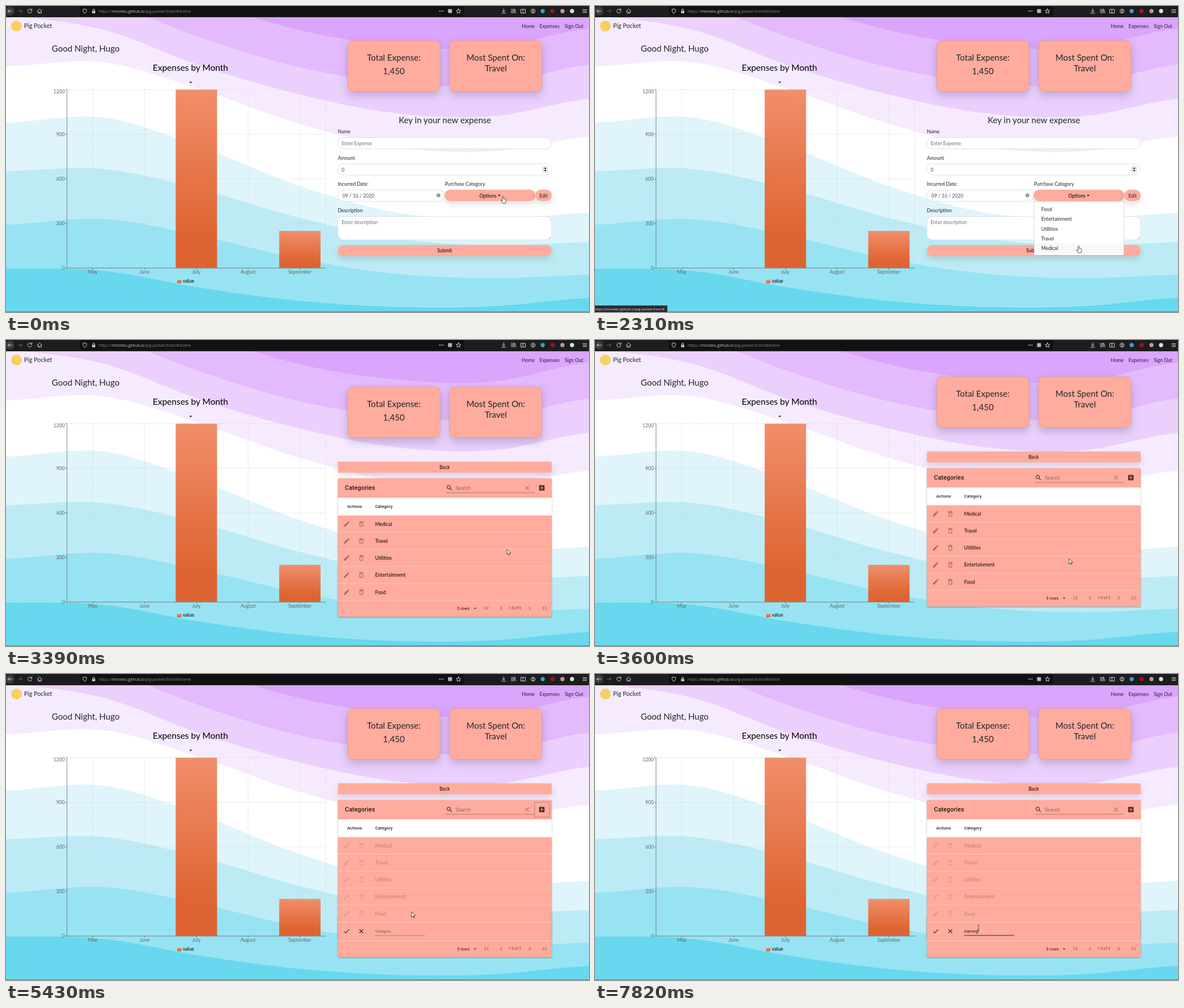
Recreate the animation shown at these times as an HTML page. Size 1032 by 543 pixels, loop 8000 ms.

```html
<!DOCTYPE html>
<html lang="en">
<head>
<meta charset="utf-8">
<title>Expense dashboard</title>
<style>
html, body { margin: 0; width: 100%; height: 100%; overflow: hidden; background: #fff; }
svg { display: block; width: 100vw; height: 100vh; }
text { font-family: Lato, sans-serif; font-size: 8.6px; fill: #212529; white-space: pre; }
.h { font-size: 15.05px; }
.m { text-anchor: middle; }
.e { text-anchor: end; }
.ax { fill: #666; }
.ph { fill: #6c757d; }
.val { fill: #495057; }
.blk { fill: #000; }
.rb { font-family: Roboto, sans-serif; font-size: 7.5px; fill: rgba(0,0,0,.87); }
.md { font-weight: 500; letter-spacing: .01em; }
.ui { font-family: "Open Sans", "Noto Sans", sans-serif; font-size: 6.9px; fill: #8b8b8d; }
.card { filter: drop-shadow(0 8px 8px rgba(0,0,0,.18)); }
.btn { filter: drop-shadow(0 5px 6px rgba(0,0,0,.13)); }
.paper { filter: drop-shadow(0 1px 1.3px rgba(0,0,0,.35)); }
.ln { fill: none; stroke: #d2d2d3; stroke-width: 1; stroke-linecap: round; stroke-linejoin: round; }
#line { transform-origin: 697px 464px; }
</style>
</head>
<body>
<svg id="stage" viewBox="0 0 1032 543" preserveAspectRatio="none"></svg>
<script>
const LOOP = 8000, PINK = '#ffab9d';
const EDIT = 3210, ADD = 4800, FOCUS = 5960;
let css = '';

// stops: [ms, declarations]
function keys(id, stops, ease = 'step-end') {
  const body = stops.map(([t, d]) => `${(t / LOOP * 100).toFixed(3)}%{${d}}`).join('');
  css += `@keyframes ${id}{${body}}#${id}{animation:${id} ${LOOP}ms ${ease} infinite}`;
}
function show(id, ...spans) {
  const stops = spans[0][0] > 0 ? [[0, 'opacity:0']] : [];
  for (const [a, b] of spans) stops.push([a, 'opacity:1'], [b, b < LOOP ? 'opacity:0' : 'opacity:1']);
  if (stops[stops.length - 1][0] < LOOP) stops.push([LOOP, 'opacity:0']);
  keys(id, stops);
}
const move = (x, y) => `transform:translate(${x}px,${y}px)`;

const text = (x, y, s, cls = '', more = '') => `<text x="${x}" y="${y}" class="${cls}" ${more}>${s}</text>`;
const rect = (x, y, w, h, r, fill, more = '') =>
  `<rect x="${x}" y="${y}" width="${w}" height="${h}" rx="${r}" fill="${fill}" ${more}/>`;
const path = (d, more = '') => `<path d="${d}" ${more}/>`;
const dot = (x, y, r, fill) => `<circle cx="${x}" cy="${y}" r="${r}" fill="${fill}"/>`;
const group = (id, s, more = '') => `<g id="${id}" ${more}>${s}</g>`;
const icon = (d, x, y, a) =>
  path(d, `fill="rgba(0,0,0,${a})" transform="translate(${x - 6.45} ${y - 6.45}) scale(.5375)"`);
const caret = (x, y) => path(`M${x - 2.4} ${y}h4.8l-2.4 2.5z`);

const ICON = {
  edit: 'M3 17.25V21h3.75L17.81 9.94l-3.75-3.75L3 17.25zM20.71 7.04c.39-.39.39-1.02 0-1.41l-2.34-2.34c-.39-.39-1.02-.39-1.41 0l-1.83 1.83 3.75 3.75 1.83-1.83z',
  bin: 'M6 19c0 1.1.9 2 2 2h8c1.1 0 2-.9 2-2V7H6v12zM8 9h8v10H8V9zm7.5-5l-1-1h-5l-1 1H5v2h14V4z',
  search: 'M15.5 14h-.79l-.28-.27C15.41 12.59 16 11.11 16 9.5 16 5.91 13.09 3 9.5 3S3 5.91 3 9.5 5.91 16 9.5 16c1.61 0 3.09-.59 4.23-1.57l.27.28v.79l5 4.99L20.49 19l-4.99-5zm-6 0C7.01 14 5 11.99 5 9.5S7.01 5 9.5 5 14 7.01 14 9.5 11.99 14 9.5 14z',
  cross: 'M19 6.41L17.59 5 12 10.59 6.41 5 5 6.41 10.59 12 5 17.59 6.41 19 12 13.41 17.59 19 19 17.59 13.41 12z',
  plus: 'M19 3H5c-1.11 0-2 .9-2 2v14c0 1.1.89 2 2 2h14c1.1 0 2-.9 2-2V5c0-1.1-.9-2-2-2zm-2 10h-4v4h-2v-4H7v-2h4V7h2v4h4v2z',
  check: 'M9 16.17L4.83 12l-1.42 1.41L9 19 21 7l-1.41-1.41z',
  down: 'M7 10l5 5 5-5z',
  first: 'M18.41 16.59L13.82 12l4.59-4.59L17 6l-6 6 6 6zM6 6h2v12H6z',
  prev: 'M15.41 7.41L14 6l-6 6 6 6 1.41-1.41L10.83 12z',
  next: 'M10 6L8.59 7.41 13.17 12l-4.58 4.59L10 18l6-6z',
  last: 'M5.59 7.41L10.18 12l-4.59 4.59L7 18l6-6-6-6zM16 6h2v12h-2z'
};

// Smooth curve through evenly spaced heights, closed to the given edge
function wave(ys, edge, fill) {
  const step = 1032 / (ys.length - 1), last = ys.length - 1;
  const slope = i => (ys[Math.min(i + 1, last)] - ys[Math.max(i - 1, 0)]) / 6;
  let d = `M0 ${edge}V${ys[0]}`;
  for (let i = 0; i < last; i++) {
    d += `C${(i + 1 / 3) * step} ${ys[i] + slope(i)} ${(i + 2 / 3) * step} ${ys[i + 1] - slope(i + 1)} ${(i + 1) * step} ${ys[i + 1]}`;
  }
  return path(d + `V${edge}Z`, `fill="${fill}"`);
}

function background() {
  return rect(0, 0, 1032, 543, 0, '#fff') +
    wave([107, 100, 148, 208, 250, 258, 232], 0, '#f6ebfe') +
    wave([18, 42, 106, 156, 190, 196, 165], 0, '#ebd0fe') +
    wave([-60, -10, 56, 108, 136, 140, 104], 0, '#e3bafe') +
    wave([-150, -80, -12, 42, 70, 74, 40], 0, '#daa5fd') +
    wave([207, 198, 250, 318, 366, 378, 367], 543, '#dff5fb') +
    wave([293, 289, 325, 375, 412, 425, 419], 543, '#bcebf6') +
    wave([388, 378, 408, 448, 475, 483, 477], 543, '#97e3f3') +
    wave([466, 470, 500, 523, 534, 533, 518], 543, '#67d8ee') +
    rect(0, 542, 1032, 1, 0, '#3f8fa6');
}

function browser() {
  const ln = d => path(d, 'class="ln"');
  return rect(0, 0, 1032, 20, 0, '#1d1d1f') + rect(131, 0, 680, 18, 1.5, '#111112') +
    dot(7, 9, 8, '#3b3b3d') + ln('M10.5 9H3.5M6.5 6L3.5 9l3 3') +
    path('M21.5 9h7M25.500 6l3 3-3 3', 'class="ln" style="stroke:#666"') +
    ln('M45 6.500A3.600 3.600 0 1 0 45.800 9.500M45.800 5v2.500h-2.500') +
    ln('M55.500 9l4-3.800 4 3.800M56.700 8.500v4h5.600v-4M59.500 12.500v-2') +
    ln('M139.500 5.300l3.200 1c0 3.500-.7 5.500-3.200 7-2.500-1.500-3.200-3.500-3.200-7z') +
    rect(152.300, 8.500, 5.800, 4.400, .6, '#bbb') + ln('M153.500 8.500v-1.300a1.700 1.700 0 0 1 3.400 0v1.300') +
    `<text x="164" y="11.800" class="ui">https://<tspan fill="#c9c9ca">mirotelu.github.io</tspan>/pig-pocket-front/#/home</text>` +
    [767.500, 770.500, 773.500].map(x => dot(x, 9, .9, '#ccc')).join('') +
    rect(782.500, 5.500, 7, 7, 1, '#b5b5b6') +
    ln('M801 5l1.200 2.700 2.900.3-2.200 1.900.7 2.900-2.600-1.500-2.600 1.500.7-2.900-2.200-1.900 2.900-.3z') +
    ln('M881 5v5.500M878.500 8.300l2.500 2.400 2.500-2.400M877.500 12.800h7') +
    ln('M895 5.500v7M897.300 5.500v7M899.600 5.500v7M900.600 5.700l2 6.800') +
    ln('M911.500 6h8v6.500h-8zM915 6v6.500') +
    `<circle cx="933" cy="9" r="3.600" class="ln"/>` + dot(933, 8, 1.300, '#ccc') + ln('M931 11.200q2-1.500 4 0') +
    dot(950, 9, 3.700, '#3f9fc0') + dot(967.500, 9, 3.700, '#a3141f') + dot(985, 9, 3.700, '#c59a86') +
    dot(1002, 9, 3.700, '#dedede') + ln('M1021 6.500h7M1021 9h7M1021 11.500h7');
}

function nav() {
  return dot(18.500, 35.500, 9.500, '#f8d060') + text(32, 39.300, 'Pig Pocket', '', 'style="font-size:10.75px"') +
    text(913, 39, 'Home') + text(944.500, 39, 'Expenses') + text(989, 39, 'Sign Out');
}

function chart() {
  const months = ['May', 'June', 'July', 'August', 'September'];
  const mid = i => 108 + 91.600 * (i + .5);
  const top = v => 465 - v * 316.500 / 1200;
  const bar = (i, v) => rect(mid(i) - 36.600, top(v), 73.200, 465 - top(v), 0, 'url(#bar)');
  let grid = '', axis = 'M108 148.500V465H566', labels = '';
  for (let v = 0; v <= 1200; v += 300) {
    grid += `M108 ${top(v)}H566`;
    axis += `M105 ${top(v)}h3`;
    labels += text(104, v === 1200 ? 155.300 : top(v) + 3.200, v, 'ax e');
  }
  months.forEach((m, i) => {
    grid += `M${mid(i)} 148.500V465`;
    axis += `M${mid(i)} 465v3`;
    labels += text(mid(i), 475.300, m, 'ax m');
  });
  grid += 'M566 148.500V465';
  return `<defs><linearGradient id="bar" x2="0" y2="1"><stop stop-color="#f18e6b"/>
    <stop offset=".82" stop-color="#de6431"/><stop offset="1" stop-color="#de6431"/></linearGradient></defs>` +
    text(81, 81, 'Good Night, Hugo', 'h') + text(326.500, 114.500, 'Expenses by Month', 'm blk', 'style="font-size:15.5px"') +
    caret(327, 134.500) + path(grid, 'fill="none" stroke="#ccc" stroke-width=".7" stroke-dasharray="1.6 1.6"') +
    path(axis, 'fill="none" stroke="#666" stroke-width=".8"') + bar(2, 1200) + bar(4, 250) + labels +
    rect(303, 486, 7.500, 6, 0, 'url(#bar)') + text(313, 491.300, 'value', 'blk');
}

function cards() {
  const card = x => rect(x, 61, 164, 90.500, 9, PINK, 'class="card" stroke="rgba(0,0,0,.14)" stroke-width=".6"');
  return card(604.500) + card(785) + text(686.500, 97, 'Total Expense:', 'h m') + text(686.500, 121, '1,450', 'h m') +
    text(867, 97, 'Most Spent On:', 'h m') + text(867, 115.500, 'Travel', 'h m');
}

function form() {
  const box = (y, w, h) => rect(587.500, y, w, h, 9.500, '#fff', 'stroke="#ced4da" stroke-width=".7"');
  const btn = (x, y, w) => rect(x, y, w, 20, 9.800, PINK, 'class="btn"');
  return text(777, 208, 'Key in your new expense', 'h m') +
    text(587.500, 226, 'Name') + box(233.500, 378.500, 20) + text(594, 247, 'Enter Expense', 'ph') +
    text(587.500, 272.500, 'Amount') + box(280, 378.500, 20) + text(594, 293.500, '0', 'val') +
    rect(950.500, 285.300, 8, 9.400, .8, '#e6e6e6', 'stroke="#aaa" stroke-width=".5"') +
    path('M952.500 289l2-2.500 2 2.500zM952.500 291l2 2.500 2-2.500z') +
    text(587.500, 319, 'Incurred Date:') + text(777, 319, 'Purchase Category') +
    box(326.500, 189, 20) + text(595.500, 340, '09 / 16 / 2020', 'val') + dot(765.500, 336, 3.300, '#858585') +
    path('M764.300 334.800l2.400 2.400M766.700 334.800l-2.400 2.400', 'stroke="#fff" stroke-width=".8"') +
    text(587.500, 365.500, 'Description') + box(373.500, 378.500, 41.500) + text(594, 386.800, 'Enter description', 'ph') +
    path('M960 413.500l4-4M962.500 413.500l1.500-1.500', 'stroke="#999" stroke-width=".6"') +
    btn(776.500, 326, 160.500) + btn(937, 326, 29) + text(838, 339.500, 'Options', 'blk') + caret(873, 335.200) +
    text(951.500, 339.500, 'Edit', 'm') + btn(587.500, 424, 378.500) + text(776.500, 437.300, 'Submit', 'm blk');
}

function menu() {
  const items = ['Food', 'Entertainment', 'Utilities', 'Travel', 'Medical'];
  return rect(777.300, 347, 159.200, 95.300, 2, '#fff', 'stroke="rgba(0,0,0,.2)" stroke-width=".7"') +
    group('hover', rect(777.800, 352.300, 158.200, 17.300, 0, '#f6f7f8')) +
    items.map((s, i) => text(790, 364 + 17.300 * i, s)).join('');
}

function table() {
  const names = ['Medical', 'Travel', 'Utilities', 'Entertainment', 'Food'];
  const rule = y => path(`M587.500 ${y}H966`, 'stroke="#f3d3cc" stroke-width=".8"');
  const rows = names.map((s, i) => {
    const y = 304.500 + 30.200 * i;
    return icon(ICON.edit, 603, y, .38) + icon(ICON.bin, 629, y, .38) + text(653.500, y + 3.200, s, 'blk');
  }).join('');
  const rules = names.map((s, i) => rule(319.500 + 30.200 * i)).join('');
  const pager = text(798.500, 456.700, '5 rows', 'rb') + icon(ICON.down, 830.500, 454.300, .6) +
    icon(ICON.first, 851, 454, .38) + icon(ICON.prev, 876.500, 454, .38) +
    text(889.500, 456.300, '1-5 of 5', 'rb', 'style="font-size:6.6px;fill:rgba(0,0,0,.58)"') +
    icon(ICON.next, 927, 454, .38) + icon(ICON.last, 953, 454, .38);
  return rect(587.500, 194, 378.500, 19.500, 2, PINK, 'class="btn"') + text(776.500, 206.800, 'Back', 'm blk') +
    group('more', rect(587.500, 430, 378.500, 72.500, 2, PINK, 'class="paper"')) +
    rect(587.500, 223.500, 378.500, 245.700, 2, PINK, 'class="paper"') +
    group('cover', rect(587.500, 460, 378.500, 20, 0, PINK)) +
    text(600, 244.400, 'Categories', 'rb md', 'style="font-size:10.75px"') +
    icon(ICON.search, 785, 240.500, .8) + text(796, 243.500, 'Search', 'rb', 'style="font-size:8.6px;fill:rgba(0,0,0,.4)"') +
    icon(ICON.cross, 922.500, 240.500, .35) + path('M779 249H936', 'stroke="rgba(0,0,0,.45)" stroke-width=".7"') +
    icon(ICON.plus, 948.500, 240.500, .7) +
    group('ring', rect(935.700, 227.500, 26.300, 26.300, 0, 'none', 'stroke="#33211e" stroke-width=".6" stroke-dasharray=".8 .8"')) +
    rect(587.500, 258, 378.500, 31.500, 0, '#fff') + text(604, 275.700, 'Actions', 'rb md') + text(653.500, 275.700, 'Category', 'rb md') +
    rules + group('rows', rows) + group('pager', pager) + group('entry', entry() + rule(473.500));
}

function entry() {
  return icon(ICON.check, 603, 456.500, .87) + icon(ICON.cross, 629, 456.500, .87) +
    path('M653.300 464H741.500', 'stroke="rgba(0,0,0,.42)" stroke-width=".7"') +
    path('M653.300 463.800H741.500', 'id="line" stroke="#3f51b5" stroke-width="1.200"') +
    group('hint', text(653.500, 458.800, 'Category', 'rb', 'style="font-size:7px;fill:rgba(0,0,0,.45)"')) +
    typed.map(([t, s], i) => group('typed' + i, text(653.500, 458.800, s, 'rb word', 'style="font-size:7px"'))).join('');
}

function status() {
  return rect(-1, 531.500, 129, 12, 0, '#2b2b2e', 'stroke="#666" stroke-width=".6"') +
    text(-1.500, 539.700, 'https://mirotelu.github.io/pig-pocket-front/#', 'ui', 'style="font-size:6.05px;fill:#f0f0f0"');
}

function cursor() {
  const look = 'fill="#fff" stroke="#111" stroke-width=".75" stroke-linejoin="round"';
  return group('hand', path('M0 0c.8 0 1.100.5 1.100 1.200V4.200l3 .7c1 .3 1.300.8 1.200 1.900L4.700 9.500 4 12H-.8L-3.500 8c-.6-1 .6-1.800 1.500-1l.9.8V1.200C-1.100.5-.8 0 0 0z', look)) +
    group('arrow', path('M0 0V9.300l2.100-2 1.500 3.300 1.500-.7-1.500-3.100h2.900z', look)) +
    group('beam', path('M-1.700-4.500H-.4L0-4 .4-4.500H1.700M0-4V4M-1.700 4.500H-.4L0 4 .4 4.500H1.700', 'fill="none" stroke="#222" stroke-width=".7"'));
}

const typed = [[FOCUS, ''], [6450, 'G'], [6970, 'Ga'], [7200, 'Gam'], [7400, 'Gami'], [7690, 'Gamin'], [7820, 'Gaming']];
const stage = document.getElementById('stage');
stage.innerHTML = background() + browser() + nav() + chart() +
  group('column', cards() + group('form', form()) + group('table', table())) +
  group('menu', menu()) + group('status', status()) + group('cursor', cursor());

// Text caret after each typed prefix
for (const w of stage.querySelectorAll('.word')) {
  const x = 653.700 + (w.textContent ? w.getComputedTextLength() : 0);
  w.insertAdjacentHTML('afterend', rect(x, 452.300, .6, 7.700, 0, '#111'));
}

show('menu', [490, EDIT]);
show('status', [1240, 2720]);
show('form', [0, EDIT]);
show('table', [EDIT, LOOP]);
['more', 'cover', 'entry'].forEach(id => show(id, [ADD, LOOP]));
show('ring', [ADD, FOCUS]);
show('hint', [ADD, 6450]);
typed.forEach(([t], i) => show('typed' + i, [t, i < typed.length - 1 ? typed[i + 1][0] : LOOP]));
show('hand', [0, EDIT], [4560, 5160]);
show('arrow', [EDIT, 4560], [5160, 5720]);
show('beam', [5720, LOOP]);

keys('rows', [[0, 'opacity:1'], [ADD, 'opacity:.26'], [LOOP, 'opacity:.26']]);
keys('pager', [[0, move(0, 0)], [ADD, move(0, 33.500)], [LOOP, move(0, 33.500)]]);
keys('hover', [[0, 'opacity:0'],
  ...[[1240, 0], [1440, 1], [1660, 2], [1870, 3], [2030, 4], [2340, 3], [2455, 2], [2545, 1], [2635, 0]]
    .map(([t, n]) => [t, 'opacity:1;' + move(0, 17.300 * n)]),
  [2700, 'opacity:0'], [LOOP, 'opacity:0']]);
keys('column', [[0, move(0, 0)], [EDIT - 1, move(0, 0)],
  [EDIT, move(0, 49.600) + ';animation-timing-function:cubic-bezier(.3333,.6667,.6667,1)'],
  [3749, move(0, 0)], [LOOP, move(0, 0)]], 'linear');
keys('line', [[0, 'transform:scaleX(0)'],
  [FOCUS, 'transform:scaleX(0);animation-timing-function:cubic-bezier(0,0,.2,1)'],
  [FOCUS + 170, 'transform:scaleX(1)'], [LOOP, 'transform:scaleX(1)']], 'linear');
keys('cursor', [
  [0, 880, 338], [1030, 880, 338], [1400, 858, 366], [1830, 822, 400], [2060, 832, 424], [2310, 856, 426],
  [2450, 885, 405], [2660, 925, 365], [2830, 949, 333], [3150, 949, 334], [3390, 887, 371], [3600, 839, 388],
  [3900, 846, 354], [4290, 883, 307], [4600, 947, 238], [5130, 948, 237], [5430, 718, 422], [5700, 690, 445],
  [5910, 679, 450], [LOOP, 679, 450]
].map(([t, x, y]) => [t, move(x, y)]), 'linear');

const sheet = document.createElement('style');
sheet.textContent = css;
document.head.append(sheet);
</script>
</body>
</html>
```
